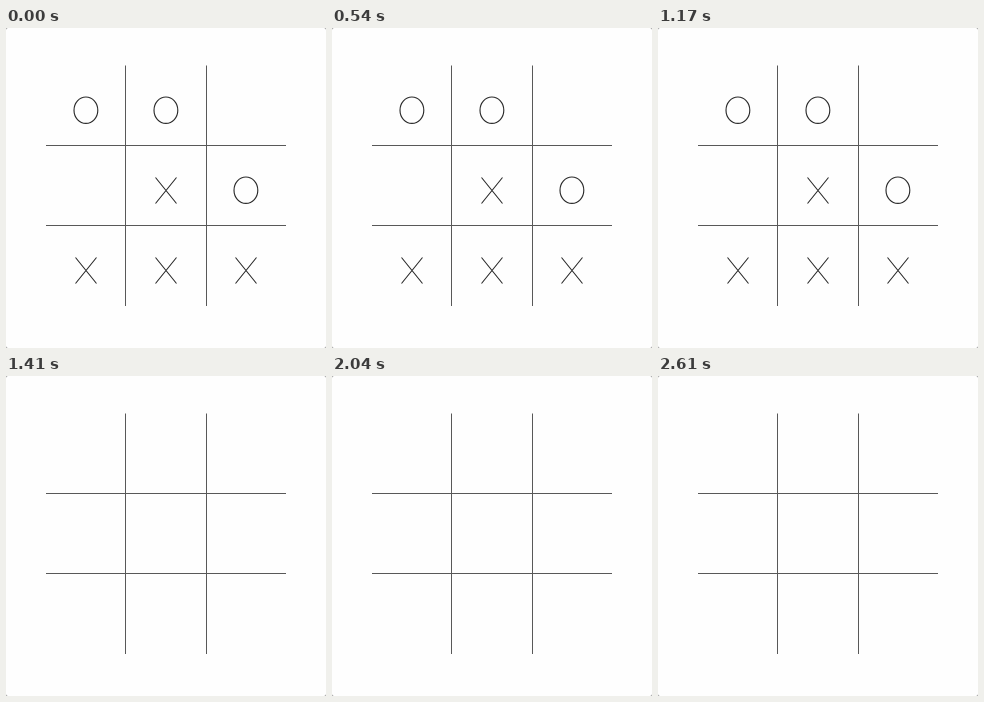
Animation of 320x320 px, one loop 2.73 s. Source, as an HTML page:

```html
<!DOCTYPE html>
<html lang="en">
<head>
<meta charset="utf-8">
<title>Tic-tac-toe</title>
<style>
  html, body { margin: 0; width: 100%; height: 100%; overflow: hidden; background: #888; }
  svg { display: block; width: 100vw; height: 100vh; background: #fefefe; border-radius: 2px; }
  path, ellipse { fill: none; stroke: #2c2c2c; stroke-width: 1.15; }
  #grid { stroke: #585858; stroke-width: 1; }
</style>
</head>
<body>
<svg viewBox="0 0 320 320">
  <path id="grid" d="M119.5 37.5V278M200.5 37.5V278M40 117.5H280M40 197.5H280"/>
  <g id="game"></g>
  <g id="pair"></g>
</svg>
<script>
const LOOP = 2730;
const $ = id => document.getElementById(id);
const grid = $('grid'), game = $('game'), pair = $('pair');

const cell = i => 80 + i * 80;

const ring = (col, row) =>
  `<ellipse cx="${cell(col) - 0.1}" cy="${cell(row) + 2.2}" rx="11.9" ry="13.2"/>`;

function cross(col, row, w = 21, h = 26, dy = 2.5) {
  const x = cell(col) - w / 2, y = cell(row) + dy - h / 2;
  return `<path d="M${x} ${y}l${w} ${h}m0 ${-h}l${-w} ${h}"/>`;
}

game.innerHTML = ring(0, 0) + ring(1, 0) + ring(2, 1) +
  cross(1, 1) + cross(0, 2) + cross(1, 2) + cross(2, 2);
pair.innerHTML = cross(1, 1, 15, 30, 0.8) + ring(2, 1);

// [start time, visible layers]
const steps = [
  [0, [grid, game]], [360, []],
  [540, [grid, game]], [960, []],
  [1170, [grid, game]], [1410, [grid]],
  [1710, [grid, pair]], [2040, [grid]],
  [2310, [grid, pair]], [2610, [grid]]
];

const start = performance.now();

function draw() {
  const t = (performance.now() - start) % LOOP;
  const shown = steps.filter(([at]) => at <= t).pop()[1];
  for (const layer of [grid, game, pair])
    layer.style.display = shown.includes(layer) ? '' : 'none';
  requestAnimationFrame(draw);
}
draw();
</script>
</body>
</html>
```
